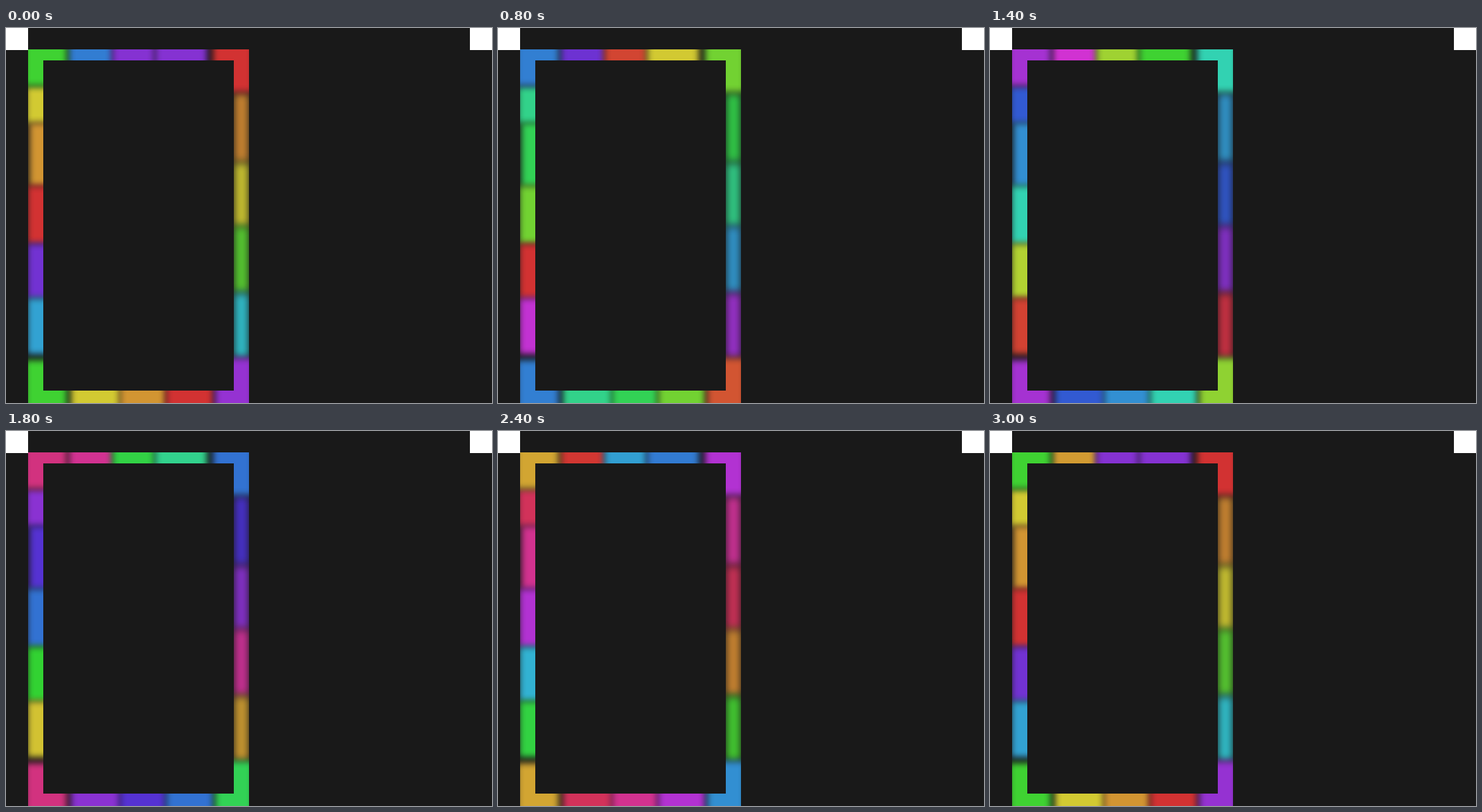
These frames come from a looping animation (704 px wide and 544 px high, 3.2 s). An HTML page:

```html
<!DOCTYPE html>
<html lang="en">
<head>
<meta charset="utf-8">
<title>Rainbow frame</title>
<style>
  html, body { margin: 0; width: 100%; height: 100%; overflow: hidden; background: #191919; }
  div { position: absolute; }
  .corner { top: 0; width: 32px; height: 32px; background: #fff; }
  #border { left: 32px; top: 31px; width: 320px; height: 513px; overflow: hidden; }
  #stage { left: -32px; top: -31px; width: 704px; height: 544px; }
  #hole { left: 54px; top: 47px; width: 276px; height: 479px; background: #191919; }
</style>
</head>
<body>
<div class="corner" style="left:0"></div>
<div class="corner" style="left:672px"></div>
<div id="border"><div id="stage"></div></div>
<div id="hole"></div>
<script>
const STEP = 200, STEPS = 16;
const stage = document.getElementById('stage');
const lights = [];

const spin = (start, rate = 24) => k => start + rate * k;
// Sweeps quickly backwards, then climbs back to where it began.
const rebound = k => k < 3 ? 271 - 78 * k : 37 + 19.5 * (k - 3);

function light(x1, y1, x2, y2, hue, blur = 5, opacity = 1) {
  const el = document.createElement('div');
  Object.assign(el.style, {
    left: x1 + 'px', top: y1 + 'px',
    width: x2 - x1 + 'px', height: y2 - y1 + 'px',
    filter: `blur(${blur}px)`, opacity
  });
  stage.append(el);
  lights.push({ el, hue });
}

const top_ = (x1, x2, hue) => light(x1, 10, x2, 66, hue);
const bottom = (x1, x2, hue) => light(x1, 506, x2, 566, hue);
const left = (y1, y2, hue, x = 31) => light(x, y1, 74, y2, hue);
const right = (y1, y2, hue) => light(329.5, y1, 352, y2, hue, 6, 0.92);

top_(91, 154, spin(212, 12.5));
top_(154, 215, spin(271));
top_(216, 291, rebound);

left(85, 138, spin(57), 29);
left(138, 229, spin(37), 34);
left(229, 313, spin(0));
left(313, 392, spin(264));
left(392, 473, spin(198));

right(95, 194, spin(33));
right(196, 287, spin(57));
right(288, 383, spin(105));
right(385, 478, spin(185));

bottom(94, 165, spin(57));
bottom(165, 231, spin(37));
bottom(232, 300, spin(0));

light(26, 10, 88, 84, spin(115));
light(300, 10, 358, 93, spin(0));
light(28, 482, 88, 566, spin(115));
light(303, 479, 358, 566, spin(277));

let shown = -1;
function draw() {
  const k = Math.floor(performance.now() / STEP) % STEPS;
  if (k !== shown) {
    shown = k;
    for (const { el, hue } of lights) {
      el.style.background = `hsl(${hue(k) % 360}, 64%, 51%)`;
    }
  }
  requestAnimationFrame(draw);
}
draw();
</script>
</body>
</html>
```
